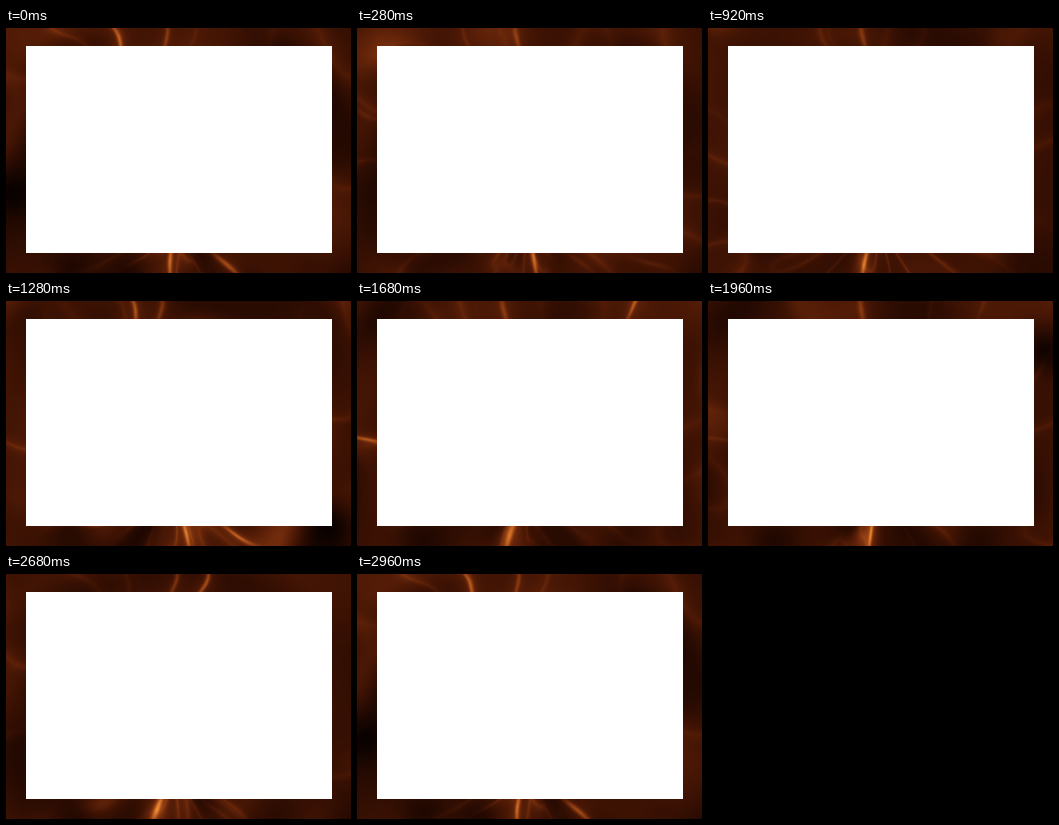
Animation, 345 px wide and 245 px high, one loop 3000 ms. Source, as an HTML page with a canvas:

```html
<!DOCTYPE html>
<html>
<head>
<meta charset="utf-8">
<style>
html, body { margin: 0; width: 100%; height: 100%; overflow: hidden; background: #fff; }
canvas { display: block; }
</style>
</head>
<body>
<canvas id="stage" width="345" height="245"></canvas>
<script>
const W = 345, H = 245, LOOP = 3000, STEP = 40, TAU = 2 * Math.PI;
const CX = 168, CY = 190; // all rays point away from here
const ctx = document.getElementById('stage').getContext('2d');
const image = ctx.createImageData(W, H);

// Brief flares and dark spots: x, y, time of their peak
const flares = [
  [117, 8, 0], [222, 235, 0], [10, 82, 560], [295, 235, 560], [130, 8, 1280],
  [232, 235, 1280], [10, 137, 1680], [287, 8, 1680], [195, 8, 2680]
];
const voids = [[6, 164, 0], [338, 95, 560], [322, 226, 1280], [338, 50, 1950]];

const mix = (a, b, u) => a + (b - a) * u;
const ease = u => u * u * (3 - 2 * u);
const polar = (x, y) => ({ a: Math.atan2(y - CY, x - CX), r: Math.hypot(x - CX, y - CY) });

const pixels = [];
for (let y = 0; y < H; y++) {
  for (let x = 0; x < W; x++) {
    const hidden = x >= 20 && x < 326 && y >= 18 && y < 225;
    if (!hidden) pixels.push({ x, y, ...polar(x, y) });
  }
}

function hash(i, j, k, seed) {
  let h = Math.imul(i, 374761393) ^ Math.imul(j, 668265263) ^ Math.imul(k, 1274126177) ^ Math.imul(seed, 974634777);
  h = Math.imul(h ^ h >>> 13, 1103515245);
  h = Math.imul(h ^ h >>> 15, 747796405);
  return ((h ^ h >>> 16) >>> 0) / 4294967296;
}

// Smooth noise that wraps around in angle and in time
function noise(turn, depth, time, cells, beats, seed) {
  const p = (turn - Math.floor(turn)) * cells, q = time * beats;
  const i = Math.floor(p), j = Math.floor(depth), k = Math.floor(q);
  const u = ease(p - i), v = ease(depth - j), w = ease(q - k);
  const i0 = i % cells, i1 = (i + 1) % cells;
  const layer = n => mix(
    mix(hash(i0, j, n % beats, seed), hash(i1, j, n % beats, seed), u),
    mix(hash(i0, j + 1, n % beats, seed), hash(i1, j + 1, n % beats, seed), u), v);
  return mix(layer(k), layer(k + 1), w);
}

function pulse(t, peak) {
  const gap = Math.abs(t - peak);
  return Math.exp(-((Math.min(gap, LOOP - gap) / 230) ** 2));
}

function activeRays(t) {
  const w = t / LOOP * TAU;
  const rays = flares.map(([x, y, peak]) => ({ ...polar(x, y), power: .8 * pulse(t, peak) }));
  rays.push({ ...polar(163 + 14 * Math.sin(3 * w), 232), power: 1 });
  rays.push({ ...polar(160 + 7 * Math.cos(w), 8), power: .5 });
  return rays.filter(ray => ray.power > .02);
}

function rayGlow(ray, a, r) {
  const along = r - ray.r;
  if (Math.abs(along) > 45) return 0;
  let turn = Math.abs(a - ray.a);
  turn = Math.min(turn, TAU - turn);
  const across = turn * r;
  if (across > 35) return 0;
  const glow = .36 * Math.exp(-((across / 2.2) ** 2)) + .2 * Math.exp(-across / 7);
  return ray.power * glow * Math.exp(-along * along / 400);
}

function draw(t) {
  const time = t / LOOP;
  const rays = activeRays(t);
  const spots = voids.map(([x, y, peak]) => ({ x, y, power: pulse(t, peak) }));
  pixels.forEach(({ x, y, a, r }) => {
    const turn = a / TAU + .5;
    const cloud = noise(turn, r / 38, time, 14, 5, 1);
    const bent = turn + .035 * (cloud - .5);
    const strand = noise(bent, r / 90, time, 26, 6, 2);
    const ridge = (1 - Math.abs(2 * strand - 1)) ** 7;
    let v = .1 + .23 * cloud + ridge * cloud * (.14 + 5 / r);
    for (const s of spots) {
      v *= 1 - .8 * s.power * Math.exp(-((x - s.x) ** 2 + (y - s.y) ** 2) / 650);
    }
    for (const ray of rays) v += rayGlow(ray, a + .2 * (cloud - .5), r);
    v = Math.min(1, v);
    const i = (y * W + x) * 4;
    image.data[i] = 255 * v;
    image.data[i + 1] = 255 * v * (.2 + .42 * v);
    image.data[i + 2] = 60 * v * v;
    image.data[i + 3] = 255;
  });
  ctx.putImageData(image, 0, 0);
  ctx.fillStyle = '#fff';
  ctx.fillRect(20, 18, 306, 207);
}

const start = performance.now();
let shown = -1;
function tick() {
  const t = Math.floor((performance.now() - start) % LOOP / STEP) * STEP;
  if (t !== shown) draw(shown = t);
  requestAnimationFrame(tick);
}
tick();
</script>
</body>
</html>
```
